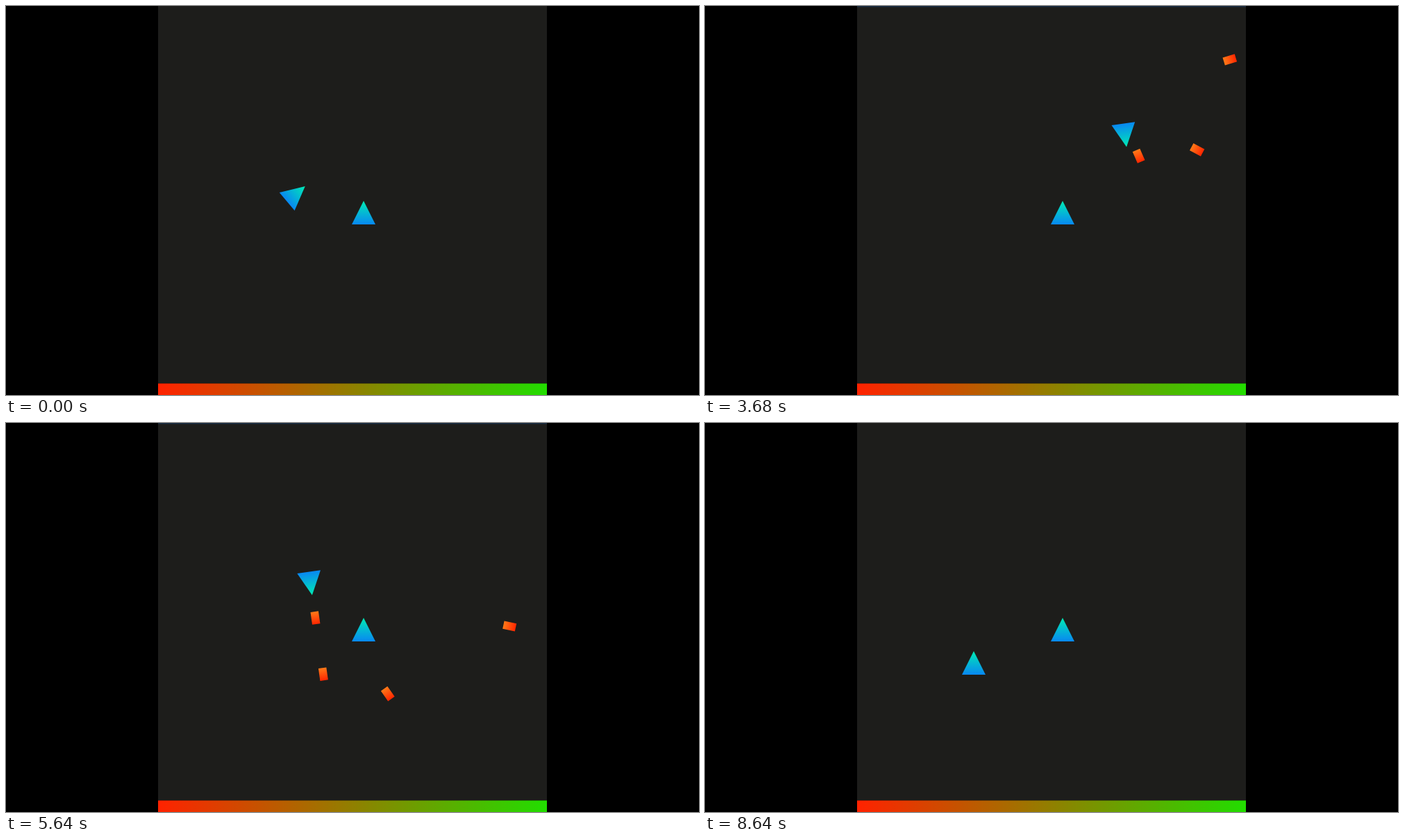
Recreate the animation shown at these times as an HTML page with a canvas. Size 998x561 px, loop 8.68 s.

```html
<!DOCTYPE html>
<html>
<head>
<meta charset="utf-8">
<style>
html, body { margin: 0; width: 100%; height: 100%; overflow: hidden; background: #000; }
canvas { display: block; }
</style>
</head>
<body>
<canvas id="stage" width="998" height="561"></canvas>
<script>
const ctx = document.getElementById('stage').getContext('2d');
const LOOP = 8680, STEP = 40;
const LEFT = 219, WIDTH = 560, BAR = 544.4;
const SPEED = 0.55, MUZZLE = 17;

// Waypoints: time, x, y, clockwise heading in degrees (0 = up).
// Between them the ship turns evenly and flies along its heading.
const route = [
  [0, 417.7, 271, 50],
  [1880, 576, 251, 138],
  [2500, 562, 285, 270],
  [3371, 577, 132, 433],
  [3516, 614, 157, 478],
  [3680, 604.7, 186.5, 532],
  [4717, 421, 238, 710],
  [4920, 438.5, 232, 770],
  [5431, 438.5, 231.5, 892],
  [5700, 438.5, 231.5, 892],
  [6960, 442.5, 408, 1000],
  [8640, 387, 346, 1080]
];
const shots = [3371, 3516, 3633, 4717, 4800, 5138, 5318, 5431, 5580];

const rad = deg => deg * Math.PI / 180;

function pose(t) {
  const last = route.length - 1;
  t = Math.min(t, route[last][0]);
  let i = 0;
  while (i < last - 1 && route[i + 1][0] <= t) i++;
  const [t0, x0, y0, h0] = route[i], [t1, x1, y1, h1] = route[i + 1];
  const u = (t - t0) / (t1 - t0), v = 1 - u;
  const pull = Math.hypot(x1 - x0, y1 - y0);
  const a = rad(h0), b = rad(h1);
  const curve = (p, q, dp, dq) =>
    v * v * (1 + 2 * u) * p + u * u * (3 - 2 * u) * q + pull * u * v * (v * dp - u * dq);
  return {
    x: curve(x0, x1, Math.sin(a), Math.sin(b)),
    y: curve(y0, y1, -Math.cos(a), -Math.cos(b)),
    angle: a + (b - a) * u
  };
}

function blend(x0, y0, x1, y1, from, to) {
  const g = ctx.createLinearGradient(x0, y0, x1, y1);
  g.addColorStop(0, from);
  g.addColorStop(1, to);
  return g;
}

function at(x, y, angle, draw) {
  ctx.save();
  ctx.translate(x, y);
  ctx.rotate(angle);
  draw();
  ctx.restore();
}

function ship() {
  ctx.fillStyle = blend(0, -17, 0, 17, '#00ebb4', '#0888f2');
  ctx.beginPath();
  ctx.moveTo(0, -17);
  ctx.lineTo(17, 17);
  ctx.lineTo(-17, 17);
  ctx.fill();
}

function bullet() {
  ctx.fillStyle = blend(0, -9, 0, 9, '#ff2600', '#ff7a18');
  ctx.fillRect(-5.75, -9, 11.5, 18);
}

function field(t) {
  ctx.fillStyle = '#000';
  ctx.fillRect(0, 0, 998, 561);
  ctx.fillStyle = '#1d1d1b';
  ctx.fillRect(LEFT, 0, WIDTH, BAR);
  if (t > 0 && t < 8640) {
    ctx.fillStyle = '#182c42';
    ctx.fillRect(LEFT, 0, WIDTH, 1.5);
  }
  ctx.fillStyle = blend(LEFT, 0, LEFT + WIDTH, 0, '#ff2200', '#22dd00');
  ctx.fillRect(LEFT, BAR, WIDTH, 561 - BAR);
}

function render(t) {
  field(t);
  ctx.save();
  ctx.beginPath();
  ctx.rect(LEFT, 0, WIDTH, BAR);
  ctx.clip();
  for (const s of shots) {
    if (t < s) continue;
    const p = pose(s), d = MUZZLE + (t - s) * SPEED;
    at(p.x + Math.sin(p.angle) * d, p.y - Math.cos(p.angle) * d, p.angle, bullet);
  }
  at(515, 298, 0, ship);
  const p = pose(t);
  at(p.x, p.y, p.angle, ship);
  ctx.restore();
}

const start = performance.now();
function tick() {
  const t = Math.max(0, performance.now() - start) % LOOP;
  render(Math.floor(t / STEP) * STEP);
  requestAnimationFrame(tick);
}
tick();
</script>
</body>
</html>
```
